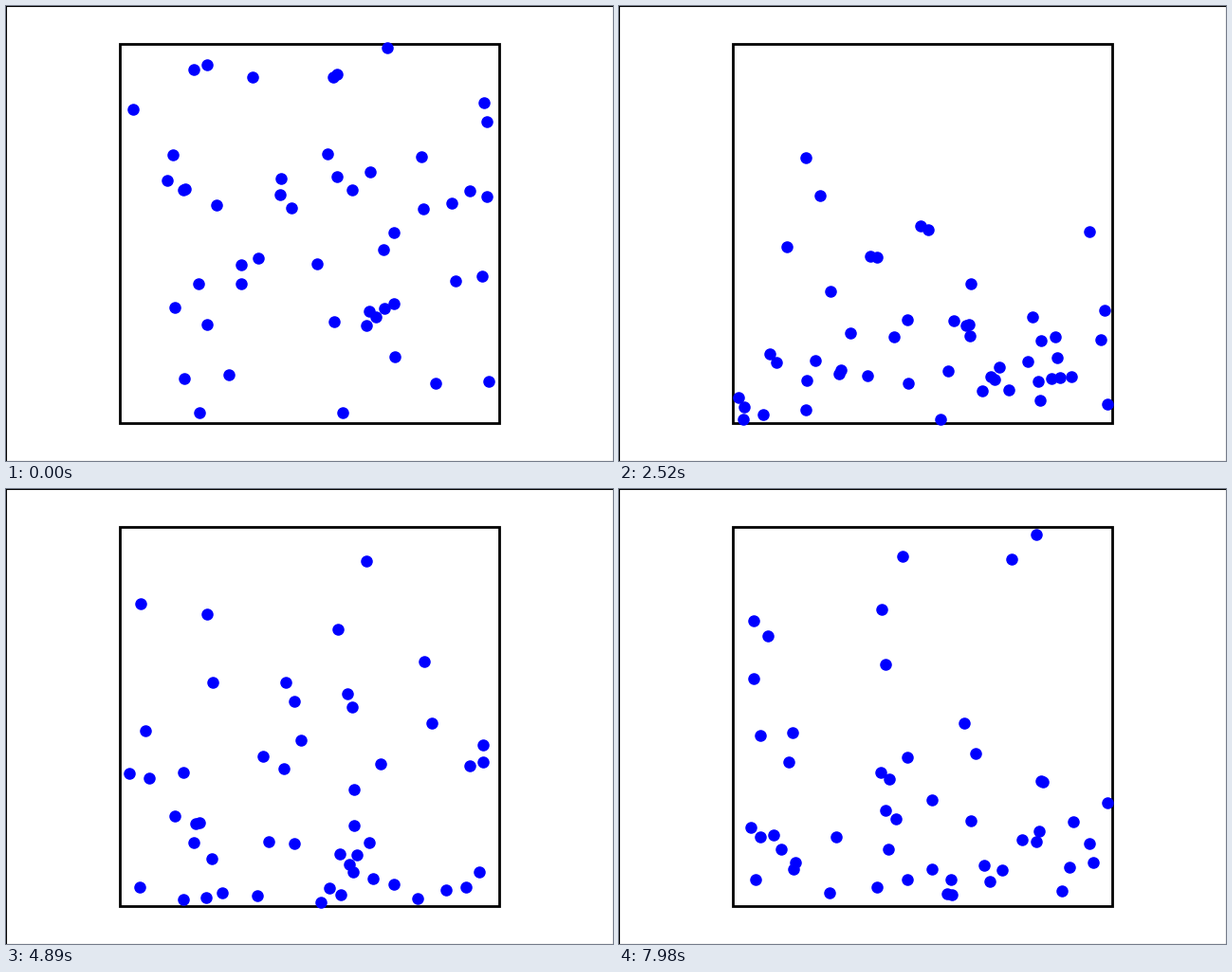
A matplotlib script that plays this animation: 640x480 px, repeating every 8000 ms.

```python
import numpy as np
import matplotlib.pyplot as plt
from matplotlib.animation import FuncAnimation

LOOP_MS, TICK_MS, STEP_MS = 8000, 20, 30
DT = 1.0 / 30
HALF = 2.0        # half the side of the box
SIZE = 0.04       # particle radius
MASS = 0.05
GRAVITY = 9.8


def collide(s, i, j):
    """Swap momentum of two equal particles, reflecting v_rel over r_rel."""
    r = s[i, :2] - s[j, :2]
    v = s[i, 2:] - s[j, 2:]
    v_cm = (MASS * s[i, 2:] + MASS * s[j, 2:]) / (MASS + MASS)
    v = 2 * r * np.dot(v, r) / np.dot(r, r) - v
    s[i, 2:] = v_cm + v * MASS / (MASS + MASS)
    s[j, 2:] = v_cm - v * MASS / (MASS + MASS)


def step(s):
    s[:, :2] += DT * s[:, 2:]

    gap = s[:, None, :2] - s[None, :, :2]
    dist = np.sqrt(gap[..., 0] ** 2 + gap[..., 1] ** 2)
    for i, j in zip(*np.where(dist < 2 * SIZE)):
        if i < j:
            collide(s, i, j)

    for k in (0, 1):
        low = s[:, k] < -HALF + SIZE
        high = s[:, k] > HALF - SIZE
        s[low, k] = -HALF + SIZE
        s[high, k] = HALF - SIZE
        s[low | high, k + 2] *= -1

    s[:, 3] -= MASS * GRAVITY * DT


def simulate(count):
    np.random.seed(0)
    s = -0.5 + np.random.random((50, 4))
    s[:, :2] *= 3.9
    path = []
    for _ in range(count):
        step(s)
        path.append(s[:, :2].copy())
    return path


path = simulate(LOOP_MS // STEP_MS + 1)

fig = plt.figure(figsize=(6.4, 4.8), dpi=100)
fig.subplots_adjust(left=0, right=1, bottom=0, top=1)
ax = fig.add_subplot(111, aspect='equal', autoscale_on=False,
                     xlim=(-3.2, 3.2), ylim=(-2.4, 2.4))
ax.set_xticks([])
ax.set_yticks([])
ax.add_patch(plt.Rectangle((-HALF, -HALF), 2 * HALF, 2 * HALF,
                           ec='k', lw=2, fc='none'))
dots, = ax.plot([], [], 'bo', ms=8)


def draw(n):
    # the picture holds for STEP_MS; sample at the middle of each tick
    pos = path[int((n + 0.5) * TICK_MS) // STEP_MS]
    dots.set_data(pos[:, 0], pos[:, 1])
    return dots,


def init():
    return draw(0)


anim = FuncAnimation(fig, draw, frames=LOOP_MS // TICK_MS, init_func=init,
                     interval=TICK_MS, repeat=True, repeat_delay=0)
plt.show()
```
